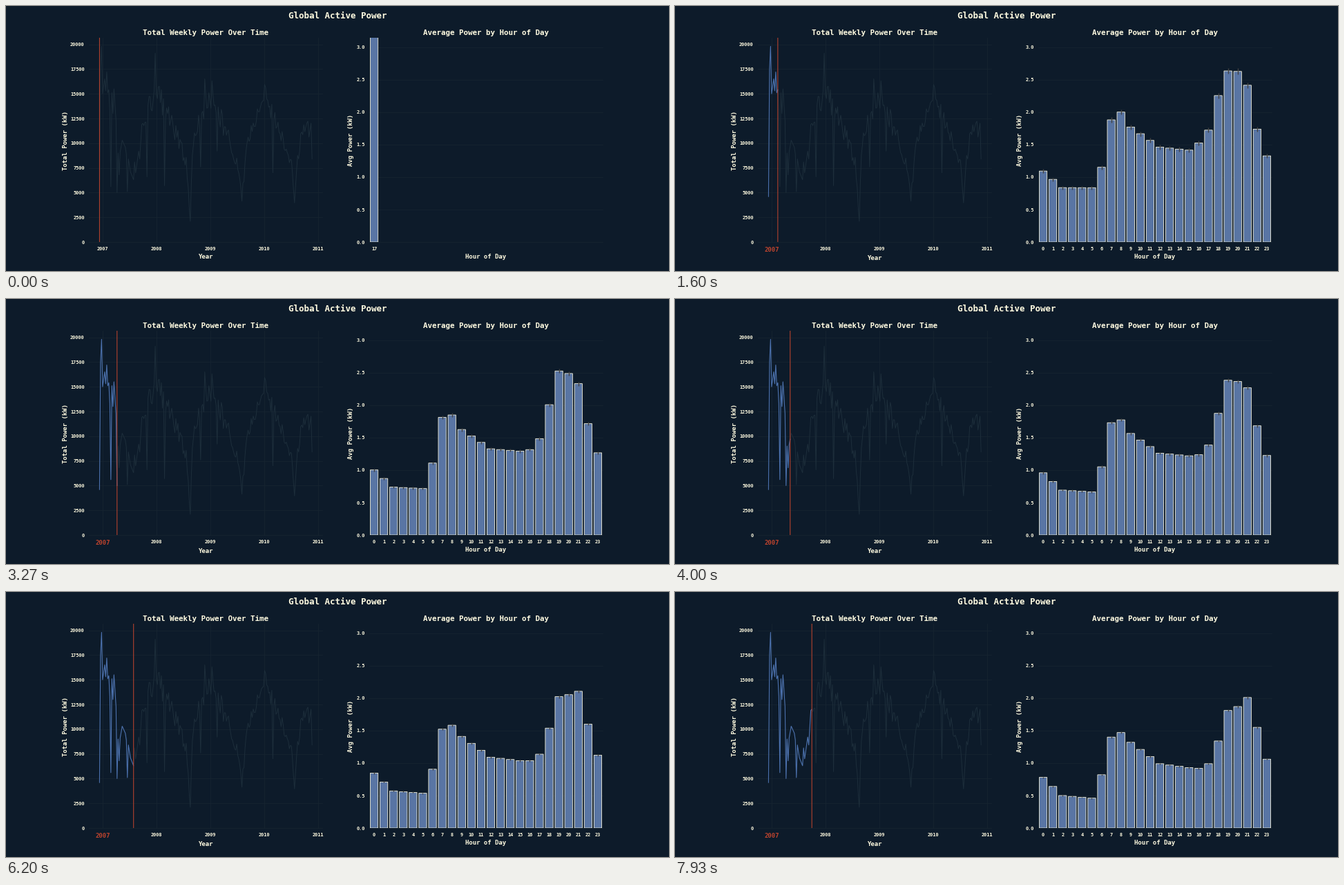
Animation of 960 by 384 pixels, one loop 8000 ms. Source, as a matplotlib script:

```python
import math
import random

import numpy as np
import matplotlib.pyplot as plt
from matplotlib.animation import FuncAnimation
from matplotlib.collections import LineCollection
from matplotlib.patches import Rectangle

W, H, DPI = 960, 384, 64
LOOP_MS, TICK_MS = 8000, 40
STEPS_PER_TICK = 0.6          # 15 data steps a second
BG, INK, GRID = "#0d1b2a", "#fefae0", "#172532"
BLUE, BAR, RED, ERR = "#4c72b0", "#5975a4", "#c1442e", "#424242"
GHOST = "#1d2e3b"

# Plot boxes in stage pixels
TOP, BASE = 46, 342
LEFT, RIGHT = (120, 458), (526, 864)
KW_PX = 35.81 / 2500
AVG_PX = 94.1
WEEK0, WEEK_PX = 135.4, 1.494
WEEKS_PER_STEP = 207 / 600
SLOT = (RIGHT[1] - RIGHT[0]) / 24

# Weekly load in 100 kW: turning points of the first months
FIRST = [(0, 46), (1, 174), (2, 198), (3, 150), (5, 165), (6, 153), (7, 172),
         (8, 151), (9, 154), (10, 133), (11, 56), (12, 151), (13, 130),
         (14, 155), (16, 123), (17, 50), (18, 90), (19, 68), (20, 91),
         (22, 103), (25, 96), (26, 89), (27, 51), (28, 84), (30, 71),
         (33, 63), (34, 81), (35, 70), (38, 92), (39, 84), (41, 119)]
# Later seasons: a trend roughened by noise, with a few sharp weeks
TREND = [(42, 120), (45, 112), (48, 142), (56, 150), (70, 120), (84, 82),
         (88, 20), (90, 92), (96, 122), (104, 140), (111, 142), (126, 102),
         (133, 80), (138, 45), (144, 108), (150, 122), (162, 152), (172, 115),
         (186, 80), (189, 40), (192, 88), (200, 122), (206, 110)]
SHARP = {46: 66, 54: 191, 63: 57, 98: 76, 102: 165, 109: 163, 114: 92,
         168: 70, 206: 84}

rng = random.Random(17)
weeks = np.arange(207)
load = np.interp(weeks, *zip(*(FIRST + TREND)))
load[43:] *= [1 + rng.uniform(-0.09, 0.09) for _ in weeks[43:]]
for week, value in SHARP.items():
    load[week] = value
line_x = WEEK0 + WEEK_PX * weeks
line_y = BASE - KW_PX * 100 * load

# Daily profiles (kW) at three steps, given at the hours where they bend
BENDS = [0, 2, 5, 6, 7, 8, 9, 12, 15, 16, 17, 18, 19, 20, 21, 22, 23]
START = [1.23, .99, 1.05, 1.09, 1.82, 2.23, 2.03, 1.66, 1.56, 1.93, 2.15,
         2.59, 2.49, 2.65, 2.46, 1.70, 1.38]
WINTER = [1.05, .79, .77, 1.17, 1.9, 1.93, 1.69, 1.40, 1.37, 1.40, 1.59,
          2.15, 2.68, 2.62, 2.40, 1.75, 1.31]
AUTUMN = [.78, .50, .46, .82, 1.40, 1.47, 1.32, .99, .93, .92, .99,
          1.34, 1.81, 1.87, 2.01, 1.55, 1.06]
START, WINTER, AUTUMN = (np.interp(range(24), BENDS, p)
                         for p in (START, WINTER, AUTUMN))
N_START, N_WINTER, N_AUTUMN = 11, 38, 119
DRIFT = np.array([rng.uniform(-0.3, 0.3) for _ in range(24)])


def blend(a, b, t):
    return a + (b - a) * t


def hourly(n):
    """Running mean load of each hour after n steps."""
    if n < N_START:
        return START * (1 + DRIFT * (1 / n - 1 / N_START))
    if n < N_WINTER:
        # sums grow evenly, so means settle like 1/n
        t = (1 / N_START - 1 / n) / (1 / N_START - 1 / N_WINTER)
        return blend(START, WINTER, t)
    t = (n - N_WINTER) / (N_AUTUMN - N_WINTER)
    return blend(WINTER, AUTUMN, t * (1.35 - 0.35 * t))


fig = plt.figure(figsize=(W / DPI, H / DPI), dpi=DPI, facecolor=BG)
ax = fig.add_axes([0, 0, 1, 1])
ax.set(xlim=(0, W), ylim=(H, 0))
ax.axis("off")


def label(x, y, text, size, **kw):
    style = dict(ha="center", va="baseline", color=INK, weight="bold",
                 family="DejaVu Sans Mono")
    return ax.text(x, y, text, fontsize=size, **{**style, **kw})


def rule(xs, ys):
    ax.plot(xs, ys, color=GRID, lw=0.8, zorder=0)


def y_axis(box, values, scale, fmt):
    for v in values:
        y = BASE - v * scale
        rule(box, (y, y))
        label(box[0] - 6.3, y + 2.6, fmt.format(v), 7.8, ha="right")


label(480, 18.5, "Global Active Power", 14.1)
label(289, 42, "Total Weekly Power Over Time", 12.2)
label(695, 42, "Average Power by Hour of Day", 12.2)
label(86, 194.5, "Total Power (kW)", 10.2, rotation=90, va="center")
label(500, 194.5, "Avg Power (kW)", 10.2, rotation=90, va="center")
label(695, 366, "Hour of Day", 10.2)
year_label = label(289, 366.5, "Year", 10.2)

y_axis(LEFT, range(0, 20001, 2500), KW_PX, "{}")
y_axis(RIGHT, np.arange(0, 3.1, 0.5), AVG_PX, "{:.1f}")
years = []
for i in range(5):
    x = 139.8 + 77.93 * i
    rule((x, x), (TOP, BASE))
    years.append(label(x, 354, str(2007 + i), 7.8))

ax.plot(line_x, line_y, color=GHOST, lw=1.1)
trace, = ax.plot([], [], color=BLUE, lw=1.2)
cursor, = ax.plot([], [], color=RED, lw=1.15, snap=False,
                  solid_capstyle="butt")

centers = RIGHT[0] + SLOT * (np.arange(24) + 0.5)
clip = Rectangle((RIGHT[0], TOP), RIGHT[1] - RIGHT[0], BASE - TOP,
                 transform=ax.transData)
bars = [ax.add_patch(Rectangle((c - 0.4 * SLOT, BASE), 0.8 * SLOT, 0, fc=BAR,
                               ec=INK, lw=0.9, snap=False, zorder=3))
        for c in centers]
errors = ax.add_collection(LineCollection([], colors=ERR, linewidths=1.6,
                                          zorder=4))
for artist in bars + [errors]:
    artist.set_clip_path(clip)
hours = [label(c, 354, str(h), 7.8) for h, c in enumerate(centers)]


def draw(tick):
    n = round(tick * STEPS_PER_TICK)
    week = math.ceil(n * WEEKS_PER_STEP)
    x = line_x[week]
    trace.set_data(line_x[:week + 1], line_y[:week + 1])
    cursor.set_data((x, x), (TOP, BASE))

    active = week >= 3
    years[0].set(color=RED if active else INK, y=355.5 if active else 354,
                 fontsize=10 if active else 7.8)
    year_label.set_y(367.7 if active else 366.5)

    # The very first reading falls in hour 17 alone and overshoots the axis
    means = hourly(n) if n else np.array([4.2] + [0] * 23)
    spread = 0.14 * np.sqrt(means / n) if n else np.zeros(24)
    errors.set_segments([[(c, BASE - AVG_PX * (m - s)),
                          (c, BASE - AVG_PX * (m + s))]
                         for c, m, s in zip(centers, means, spread)])
    errors.set_visible(n > 0)
    for bar, text, m in zip(bars, hours, means):
        bar.set_height(-AVG_PX * m)
        bar.set_visible(m > 0)
        text.set_visible(m > 0)
    hours[0].set_text("0" if n else "17")
    return []


anim = FuncAnimation(fig, draw, frames=LOOP_MS // TICK_MS, interval=TICK_MS,
                     init_func=lambda: draw(0), repeat=True, repeat_delay=0)
plt.show()
```
